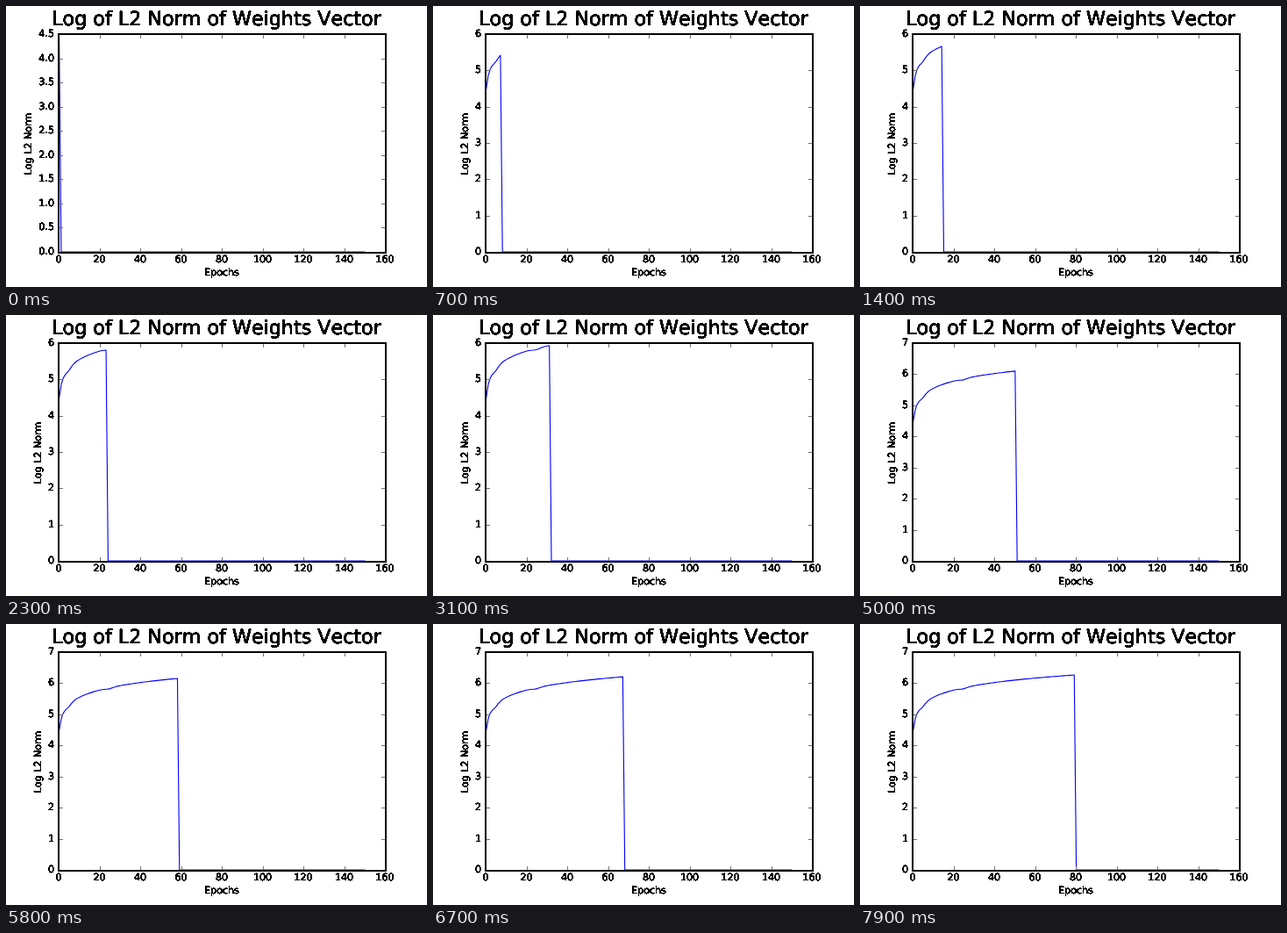
An HTML page for the animation above (8 s loop, 480 px wide and 320 px high).

```html
<!DOCTYPE html>
<html lang="en">
<head>
<meta charset="utf-8">
<title>Weights norm</title>
<style>
  html, body { margin: 0; width: 100%; height: 100%; overflow: hidden; background: #fff; }
  svg { display: block; width: 480px; height: 320px; }
  text {
    font: 11.11px "DejaVu Sans", sans-serif;
    font-kerning: none;
    text-rendering: geometricPrecision;
    text-anchor: middle;
  }
  .title { font-size: 22.22px; }
  #yLabels text { text-anchor: end; }
  .curve { fill: none; stroke: #00f; stroke-width: 1.11px; stroke-linejoin: round; }
  .tick { stroke: #707070; fill: none; }
  .frame { fill: none; stroke: #000; stroke-width: 2px; }
</style>
</head>
<body>
<svg viewBox="0 0 480 320">
  <!-- Turns soft glyph edges solid black. -->
  <filter id="hard" filterUnits="userSpaceOnUse" x="0" y="0" width="480" height="320">
    <feComponentTransfer><feFuncA type="linear" slope="25" intercept="-1"/></feComponentTransfer>
  </filter>
  <clipPath id="area"><rect x="60" y="32" width="372" height="249"/></clipPath>
  <g clip-path="url(#area)"><path class="curve" id="curve" transform="translate(.6 0)"/></g>
  <path class="tick" id="xTicks"/>
  <path class="tick" id="yTicks"/>
  <rect class="frame" x="60" y="32" width="373" height="249"/>
  <g filter="url(#hard)">
    <g id="xLabels"></g>
    <g id="yLabels"></g>
    <text class="title" x="240" y="22">Log of L2 Norm of Weights Vector</text>
    <text x="246" y="307">Epochs</text>
    <text id="yTitle">Log L2 Norm</text>
  </g>
</svg>
<script>
  const LEFT = 60, RIGHT = 432, TOP = 32, BOTTOM = 280;
  const STEP_MS = 100, STEPS = 80, LAST_EPOCH = 150;
  const el = id => document.getElementById(id);

  // Logarithmic growth after a quick start, with two slower stretches.
  const dip = (e, center, depth, width) => depth * Math.exp(-(((e - center) / width) ** 2));
  const norm = e => 4.47 + .36 * Math.log(1 + e) + .216 * (1 - Math.exp(-e))
    - dip(e, 4.5, .075, 2) - dip(e, 24.5, .035, 2.5);

  const xAt = epoch => LEFT + epoch * (RIGHT - LEFT) / 160;
  const yAt = (v, max) => BOTTOM - v * (BOTTOM - TOP) / max;
  const snap = v => Math.round(v) + .5;
  const label = (x, y, s) => `<text x="${x}" y="${y}">${s}</text>`;

  function drawXAxis() {
    let ticks = '', labels = '';
    for (let e = 0; e <= 160; e += 20) {
      const x = snap(xAt(e));
      ticks += `M${x} ${BOTTOM}v-4M${x} ${TOP}v5`;
      labels += label(xAt(e), 292, e);
    }
    el('xTicks').setAttribute('d', ticks);
    el('xLabels').innerHTML = labels;
  }

  function drawYAxis(max) {
    const step = max < 5 ? .5 : 1;
    let ticks = '', labels = '';
    for (let v = 0; v <= max; v += step) {
      const y = snap(yAt(v, max));
      ticks += `M${LEFT} ${y}h5M${RIGHT} ${y}h-4`;
      labels += label(55, Math.round(yAt(v, max)) + 3, step < 1 ? v.toFixed(1) : v);
    }
    el('yTicks').setAttribute('d', ticks);
    el('yLabels').innerHTML = labels;
    el('yTitle').setAttribute('transform', `translate(${step < 1 ? 29 : 40} 157) rotate(-90)`);
  }

  function drawCurve(epoch, max) {
    let d = '';
    for (let e = 0; e <= epoch; e++) {
      d += `${e ? 'L' : 'M'}${xAt(e).toFixed(2)} ${yAt(norm(e), max).toFixed(2)}`;
    }
    d += `L${xAt(epoch + 1)} ${BOTTOM}H${xAt(LAST_EPOCH)}`;
    el('curve').setAttribute('d', d);
  }

  let shownEpoch = -1, shownMax = 0;
  function render(time) {
    const epoch = Math.floor(time / STEP_MS) % STEPS;
    if (epoch === shownEpoch) return;
    const peak = norm(epoch);
    const max = peak <= 4.5 ? 4.5 : Math.ceil(peak);
    if (max !== shownMax) drawYAxis(max);
    drawCurve(epoch, max);
    shownEpoch = epoch;
    shownMax = max;
  }

  drawXAxis();
  render(0);
  let start;
  requestAnimationFrame(function loop(now) {
    start ??= now;
    render(now - start);
    requestAnimationFrame(loop);
  });
</script>
</body>
</html>
```
